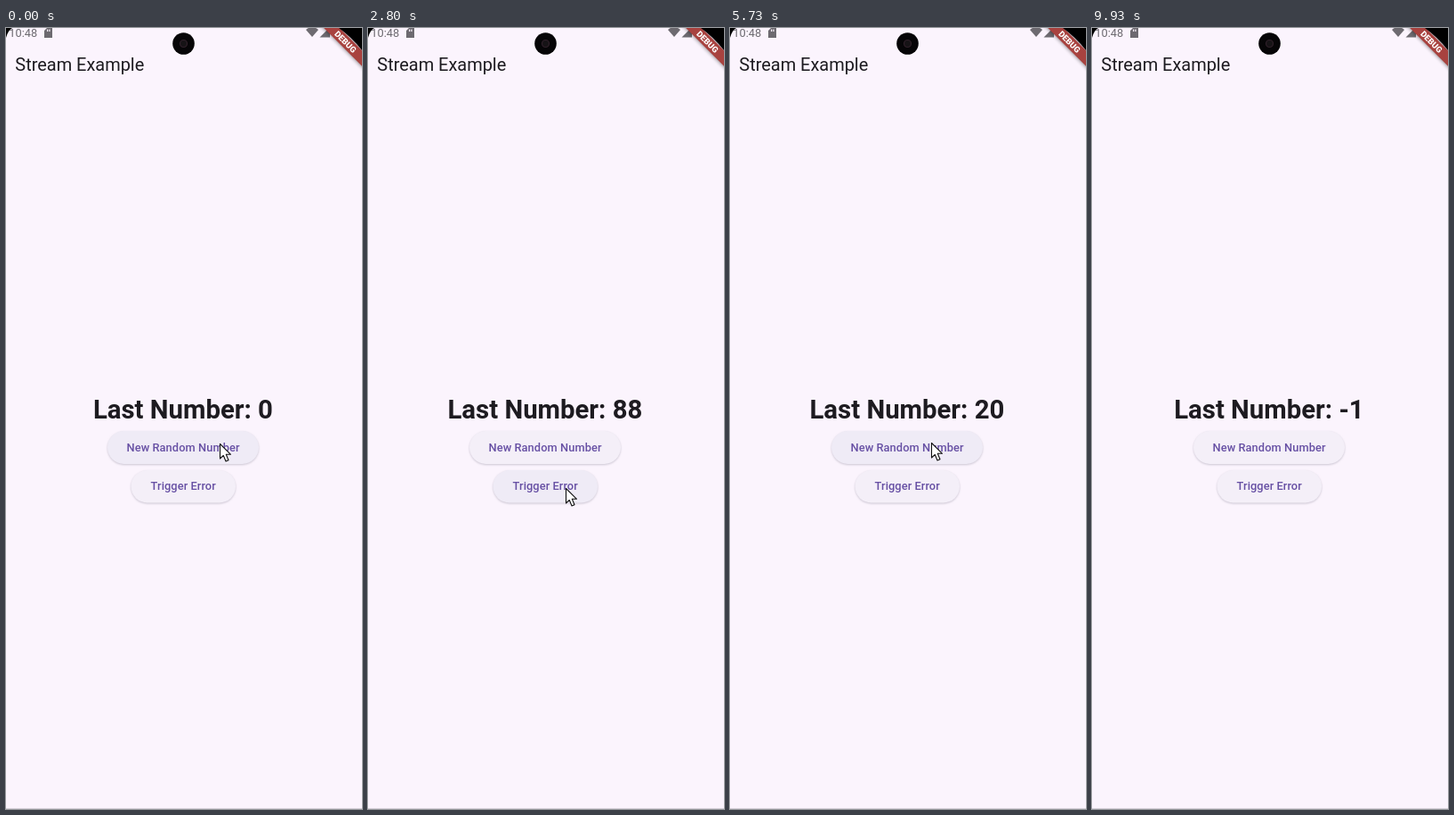
Write an HTML page that moves like this. It is 400 by 876 pixels and loops after 10000 ms.

```html
<!DOCTYPE html>
<html lang="en">
<head>
<meta charset="utf-8">
<title>Stream Example</title>
<style>
html, body { margin: 0; width: 100%; height: 100%; overflow: hidden; background: #fbf4fd; }
svg { display: block; width: 100vw; height: 100vh; font-family: Roboto, sans-serif; }
.label { font-size: 12.8px; font-weight: 500; letter-spacing: .09px; fill: #6750a4; text-anchor: middle; }
</style>
</head>
<body>
<svg viewBox="0 0 400 876">
  <defs>
    <filter id="soft" x="-10%" y="-100%" width="120%" height="300%"><feGaussianBlur stdDeviation="2"/></filter>
    <filter id="drop" x="-10%" y="-20%" width="120%" height="150%"><feGaussianBlur stdDeviation=".8"/></filter>
    <clipPath id="newClip"><rect x="114" y="452" width="170" height="37" rx="18.5"/></clipPath>
    <clipPath id="errClip"><rect x="140.5" y="496" width="117.5" height="36.5" rx="18.25"/></clipPath>
  </defs>
  <rect width="400" height="876" fill="#fbf4fd"/>
  <rect y="875" width="400" height="1" fill="#d5cfd8"/>

  <!-- status bar -->
  <g fill="#6d6a70">
    <text x="3.3" y="10.3" font-size="12.8">10:48</text>
    <path d="M46 0H52V11H43V3Z"/>
    <path d="M337 2Q344 -4 351 2L344 10Z"/>
    <path d="M364 -1V10.5H352.5Z"/>
  </g>
  <path d="M46 1.5h1.2v2.500h-1.2Z M48.3 1.5h1.2v2.500h-1.2Z" fill="#fbf4fd"/>

  <text x="10.3" y="47.8" font-size="19.95" fill="#1d1b20">Stream Example</text>

  <!-- debug ribbon -->
  <g transform="translate(381.500 15.500) rotate(45)">
    <rect x="-40" y="-6" width="80" height="12.500" fill="#000" opacity=".5" filter="url(#soft)"/>
    <rect x="-40" y="-6.250" width="80" height="12.500" fill="#a8423f"/>
    <text y="3.400" font-size="9.400" font-weight="900" fill="#fff" text-anchor="middle">DEBUG</text>
  </g>
  <path d="M0 0H7Q2 3 0 11Z M400 0H374Q388 10 400 25Z" fill="#000"/>

  <!-- camera -->
  <circle cx="199.500" cy="17.500" r="12.300" fill="#060507"/>
  <circle cx="199.500" cy="17.500" r="4" fill="#161316" stroke="#30202a" stroke-width="1.200"/>

  <text id="num" x="198.900" y="437.800" font-size="29.350" font-weight="700" fill="#1d1b20" text-anchor="middle"></text>

  <rect x="114" y="453" width="170" height="37" rx="18.500" fill="#cbc5d2" filter="url(#drop)"/>
  <rect id="newBtn" x="114" y="452" width="170" height="37" rx="18.500"/>
  <g clip-path="url(#newClip)"><circle id="newInk" fill="#e7e0f1"/></g>
  <text class="label" x="199" y="474.800">New Random Number</text>

  <rect x="140.500" y="497" width="117.500" height="36.500" rx="18.250" fill="#cbc5d2" filter="url(#drop)"/>
  <rect id="errBtn" x="140.500" y="496" width="117.500" height="36.500" rx="18.250"/>
  <g clip-path="url(#errClip)"><circle id="errInk" fill="#e7e0f1"/></g>
  <text class="label" x="199.200" y="518.300">Trigger Error</text>

  <path id="cursor" d="M.5 .5V17L4.300 13.500L7 20L10 18.700L7.300 12.300H12.500Z" fill="#fff" stroke="#111" stroke-width="1.100" stroke-linejoin="round"/>
</svg>
<script>
const LOOP = 10000;
const REST = '#f4eff8', HOVER = '#efebf6';
const el = id => document.getElementById(id);
const clamp = v => Math.max(0, Math.min(1, v));
const mix = (a, b, k) => a + (b - a) * k;
const ease = k => k * k * (3 - 2 * k);

// time, x, y of the pointer
const path = [
  [0, 240, 466], [600, 240, 466], [1200, 247, 477], [2250, 247, 477],
  [2700, 222, 516], [3900, 222, 516], [4500, 226, 465], [7250, 226, 465],
  [7700, 211, 515], [8500, 211, 515], [9070, 402, 560], [LOOP, 402, 560]
];
// press time, number it gives, button
const clicks = [
  [600, '93', 'new'], [1600, '93', 'new'], [2050, '88', 'new'], [3000, '-1', 'err'],
  [5200, '20', 'new'], [6200, '20', 'new'], [6850, '78', 'new'], [8050, '-1', 'err']
];

function pointer(t) {
  let i = 0;
  while (i < path.length - 2 && path[i + 1][0] <= t) i++;
  const [t0, x0, y0] = path[i], [t1, x1, y1] = path[i + 1];
  const k = ease(clamp((t - t0) / (t1 - t0)));
  return [mix(x0, x1, k), mix(y0, y1, k)];
}

function ink(name, t) {
  const press = clicks.filter(c => c[2] === name && c[0] <= t).pop();
  const age = press ? t - press[0] : LOOP;
  const node = el(name + 'Ink');
  node.setAttribute('opacity', clamp(age / 60) * clamp((500 - age) / 250));
  if (!press) return;
  const [x, y] = pointer(press[0]);
  node.setAttribute('cx', x);
  node.setAttribute('cy', y);
  node.setAttribute('r', mix(20, 160, ease(clamp(age / 220))));
}

function draw(t) {
  const [x, y] = pointer(t);
  el('cursor').setAttribute('transform', `translate(${x} ${y})`);
  const last = clicks.filter(c => c[0] + 100 <= t).pop();
  el('num').textContent = 'Last Number: ' + (last ? last[1] : '0');
  const over = (x0, x1, y0, y1) => x > x0 && x < x1 && y > y0 && y < y1;
  el('newBtn').setAttribute('fill', over(114, 284, 452, 489) ? HOVER : REST);
  el('errBtn').setAttribute('fill', over(140, 258, 496, 533) ? HOVER : REST);
  ink('new', t);
  ink('err', t);
}

const start = performance.now();
function tick() {
  draw((performance.now() - start) % LOOP);
  requestAnimationFrame(tick);
}
draw(0);
requestAnimationFrame(tick);
</script>
</body>
</html>
```
